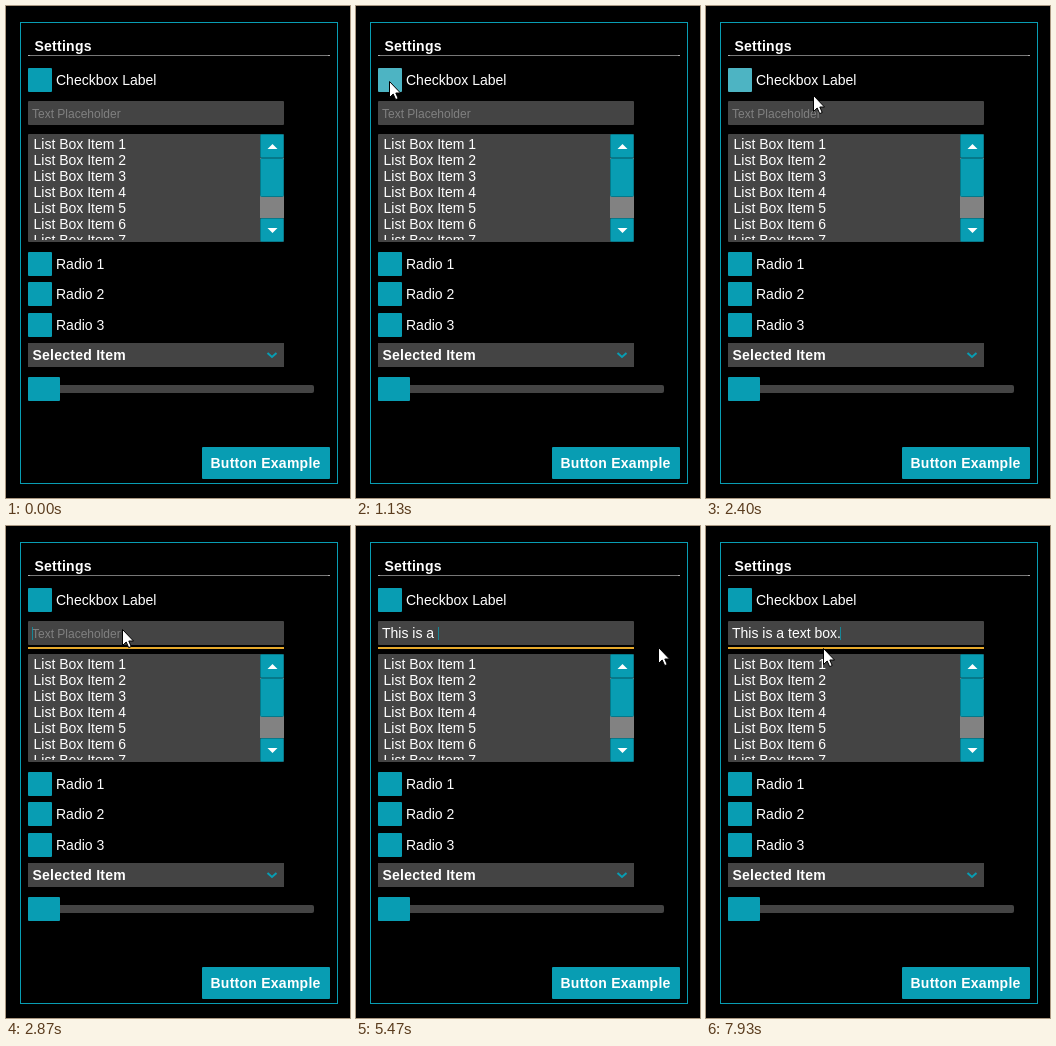
Recreate the animation shown at these times as an HTML page. Size 344 by 492 pixels, loop 8000 ms.

```html
<!DOCTYPE html>
<html lang="en">
<head>
<meta charset="utf-8">
<title>Settings panel</title>
<style>
  html, body { margin: 0; width: 100%; height: 100%; overflow: hidden; background: #000; }
  svg { display: block; width: 344px; height: 492px; }
  text { font: 14px "Liberation Sans", Arial, sans-serif; fill: #fff; white-space: pre; }
  .bold { font-weight: bold; letter-spacing: .25px; }
  .hint { font-size: 12px; fill: #808080; }
  .accent { fill: #089db3; }
  .accent.hover { fill: #4db4c3; }
  .field { fill: #444; }
  .field.hover { fill: #4c4c4c; }
  .edge { stroke: #06798a; }
  .off { display: none; }
</style>
</head>
<body>
<svg viewBox="0 0 344 492">
  <defs>
    <clipPath id="listClip"><rect x="22" y="128" width="232" height="106"/></clipPath>
  </defs>
  <rect x="14.5" y="16.5" width="317" height="461" fill="none" stroke="#089db3"/>
  <text class="bold" x="28.5" y="45">Settings</text>
  <path d="M24 49.5H322" stroke="#777"/>
  <path d="M22 49.5h2M322 49.5h2" stroke="#aaa"/>

  <rect id="box" class="accent" x="22" y="62" width="24" height="24" rx="1"/>
  <path id="tick" d="M26 74l5 5 11-10" fill="none" stroke="#fff" stroke-width="2"/>
  <text x="50" y="79">Checkbox Label</text>

  <rect id="field" class="field" x="22" y="95" width="256" height="24" rx="1"/>
  <text id="hint" class="hint" x="26" y="112">Text Placeholder</text>
  <text id="typed" x="26" y="112"></text>
  <rect id="caret" class="accent" y="101" width="1" height="13" opacity=".75"/>
  <rect id="line" x="22" y="121" width="256" height="2" fill="#e6a92c"/>

  <rect class="field" x="22" y="128" width="256" height="108" rx="1"/>
  <g id="items" clip-path="url(#listClip)"></g>
  <rect x="254" y="152" width="24" height="60" fill="#828282"/>
  <g class="accent edge">
    <rect x="254.5" y="128.5" width="23" height="23" rx="1"/>
    <rect x="254.5" y="152.5" width="23" height="38" rx="1"/>
    <rect x="254.5" y="212.5" width="23" height="23" rx="1"/>
  </g>
  <path d="M261.5 143h10l-5-5zM261.5 222h10l-5 5z" fill="#fff"/>

  <g id="radios"></g>

  <rect class="field" x="22" y="337" width="256" height="24"/>
  <text class="bold" x="26.5" y="354">Selected Item</text>
  <path d="M261.5 347l4.5 4 4.5-4" fill="none" stroke="#089db3" stroke-width="2"/>

  <rect class="field" x="38" y="379" width="270" height="8" rx="2"/>
  <rect class="accent" x="22" y="371" width="32" height="24" rx="1"/>

  <rect class="accent" x="196" y="441" width="128" height="32" rx="1"/>
  <text class="bold" x="204.5" y="462">Button Example</text>

  <path id="cursor" d="M.5 .5V16.5L4.2 13 6.7 18.6 9.2 17.5 6.8 12H11.5z" fill="#fff" stroke="#000"/>
</svg>
<script>
const LOOP = 8000, FPS = 15;
const $ = id => document.getElementById(id);
const PHRASE = "This is a text box.";
// Tick at which each character arrives
const KEYS = [65, 66, 74, 74, 76, 77, 77, 79, 80, 82, 83, 85, 86, 88, 89, 91, 92, 94, 98];

const ease = {
  line: k => k,
  soft: k => k * k * (3 - 2 * k),
  in: k => k ** 1.6,
  out: k => 1 - (1 - k) ** 1.7
};
// Pointer stops: tick, x, y, easing towards this stop
const STOPS = [
  [4, 333, 484], [16, 33, 75, "soft"], [17, 33, 75], [20, 35, 70, "out"],
  [21, 35, 70], [26, 37, 70, "line"], [27, 37, 70], [32, 104, 70, "soft"],
  [34, 104, 70], [36, 107, 89, "in"], [40, 116, 103, "out"], [43, 116, 103],
  [51, 302, 121, "soft"], [108, 302, 121], [114, 190, 106, "in"],
  [116, 143, 104, "line"], [119, 117, 122, "out"]
];

const label = (x, y, s) => `<text x="${x}" y="${y}">${s}</text>`;
$("items").innerHTML = [1, 2, 3, 4, 5, 6, 7]
  .map(i => label(27.5, 127 + 16 * i, "List Box Item " + i)).join("");
$("radios").innerHTML = [246, 276, 307].map((y, i) =>
  `<rect class="accent" x="22" y="${y}" width="24" height="24" rx="1"/>` +
  label(50, y + 17, "Radio " + (i + 1))).join("");

const show = (id, on) => $(id).classList.toggle("off", !on);
const hover = (id, on) => $(id).classList.toggle("hover", on);
const within = (n, from, to) => n >= from && n < to;

function pointer(n) {
  const i = STOPS.findIndex(s => s[0] >= n);
  if (i < 1) return STOPS[0].slice(1, 3);
  const [a, x0, y0] = STOPS[i - 1], [b, x1, y1, kind = "line"] = STOPS[i];
  const k = ease[kind]((n - a) / (b - a));
  return [x0 + (x1 - x0) * k, y0 + (y1 - y0) * k].map(Math.round);
}

function draw(n) {
  show("cursor", n >= 4);
  $("cursor").setAttribute("transform", `translate(${pointer(n)})`);
  hover("box", within(n, 17, 37));
  show("tick", within(n, 23, 29));
  hover("field", within(n, 38, 43));
  show("line", n >= 43);
  show("caret", n >= 43);
  show("hint", n < KEYS[0]);
  const typed = $("typed");
  typed.textContent = PHRASE.slice(0, KEYS.filter(k => k <= n).length);
  const width = typed.textContent ? typed.getComputedTextLength() : 0;
  $("caret").setAttribute("x", Math.floor(26 + width));
}

let last = -1;
function tick() {
  const t = performance.now() % LOOP;
  const n = Math.floor((t + 5) * FPS / 1000) % (LOOP * FPS / 1000);
  if (n !== last) draw(last = n);
  requestAnimationFrame(tick);
}
tick();
</script>
</body>
</html>
```
